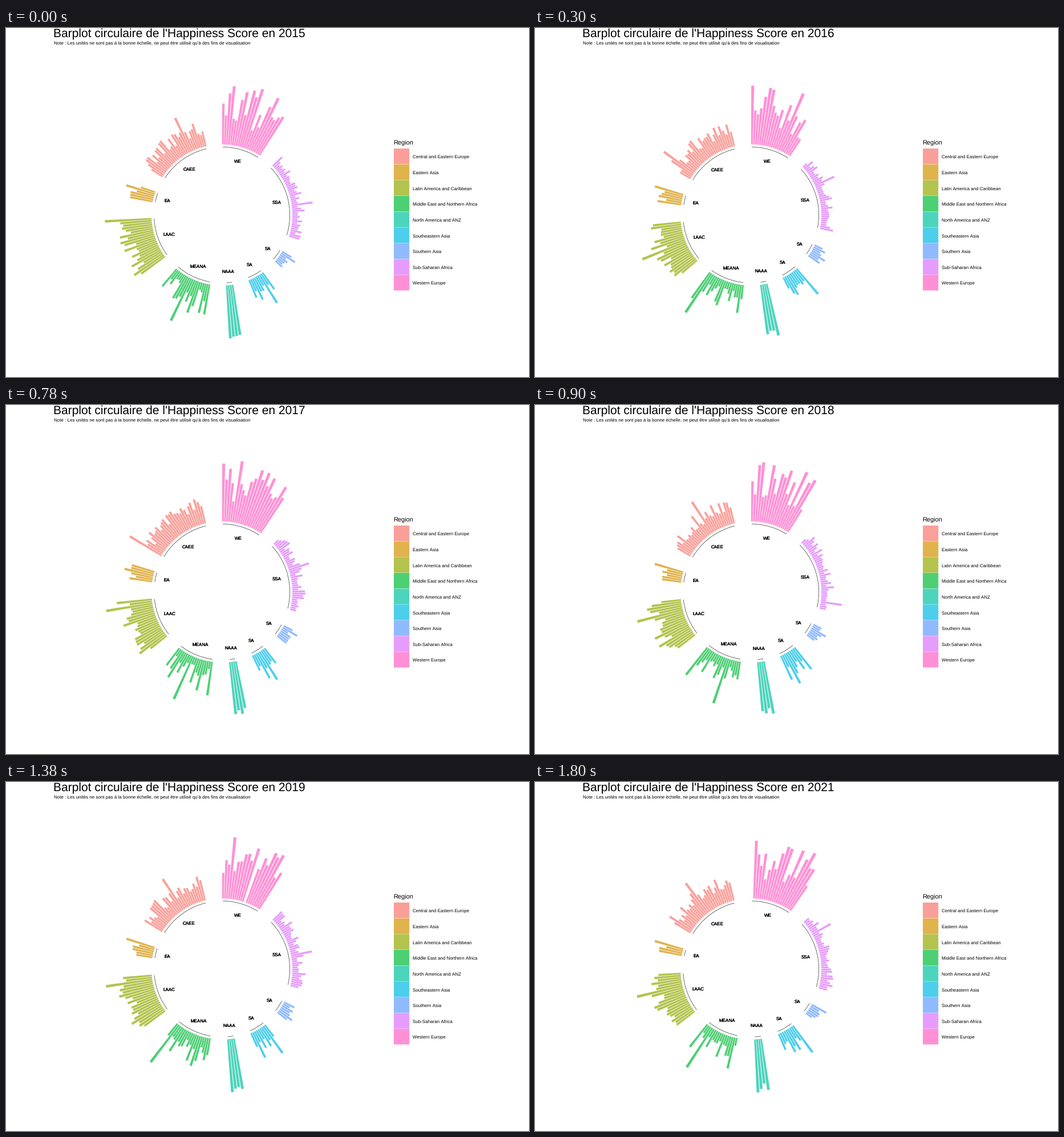
A matplotlib script for the animation above (2.1 s loop, 917 by 611 pixels).

```python
from collections import namedtuple

import numpy as np
import matplotlib.pyplot as plt
from matplotlib.animation import FuncAnimation
from matplotlib.collections import LineCollection, PolyCollection
from matplotlib.patches import Rectangle

plt.rcParams["font.family"] = "Liberation Sans"
plt.rcParams["text.hinting"] = "none"
plt.rcParams["text.hinting_factor"] = 1

W, H, DPI = 917, 611, 100
CX, CY = 378.6, 327.3
R_BAR, R_LINE, R_LABEL = 123.5, 119, 99
GAP = 8  # empty slots after each region
MARGIN = 0.1  # part of a slot left free on each side of a bar

# low, high and skew shape the bar lengths; the tallest bar reaches top
# and stands at a given place each year
Region = namedtuple("Region", "label name color size low high skew top peaks")
REGIONS = [
    Region("WE", "Western Europe", "#FF61C3", 21, 32, 105, 0.9, 108, (11, 14, 5, 15, 3, 3, 17)),
    Region("SSA", "Sub-Saharan Africa", "#DB72FB", 36, 9, 24, 2, 37, (23, 11, 15, 32, 20, 10, 7)),
    Region("SA", "Southern Asia", "#619CFF", 7, 12, 24, 1, 29, (1, 4, 1, 2, 5, 0, 0)),
    Region("SEA", "Southeastern Asia", "#00B9E3", 9, 18, 50, 1.4, 58, (2, 0, 3, 6, 1, 6, 0)),
    Region("NAAA", "North America and ANZ", "#00C19F", 4, 76, 92, 0.5, 93, (3, 0, 1, 0, 3, 0, 3)),
    Region("MEANA", "Middle East and Northern Africa", "#00BA38", 19, 13, 62, 1.7, 82,
           (10, 17, 10, 6, 17, 14, 13)),
    Region("LAAC", "Latin America and Caribbean", "#93AA00", 21, 34, 64, 1.3, 82,
           (21, 11, 18, 14, 17, 19, 14)),
    Region("EA", "Eastern Asia", "#D39200", 6, 25, 42, 0.9, 52, (4, 5, 3, 5, 5, 2, 3)),
    Region("CAEE", "Central and Eastern Europe", "#F8766D", 29, 20, 46, 1.1, 65,
           (20, 3, 0, 16, 15, 24, 13)),
]

# region sizes that depart from the usual, and western bars left blank
SIZES = {
    2015: dict(SSA=40, MEANA=20, LAAC=22),
    2016: dict(SSA=34, LAAC=22),
    2017: dict(SEA=8),
    2018: dict(WE=20, LAAC=20),
    2019: dict(WE=20, LAAC=20, CAEE=28),
    2020: dict(SA=6, MEANA=17, EA=4),
    2021: dict(SSA=35, SA=6, MEANA=17, EA=4, CAEE=28),
}
YEARS = list(SIZES)
BLANK = {2019: 11, 2020: 11, 2021: 0}


def tint(color, a=0.7):
    rgb = np.array([int(color[i:i + 2], 16) for i in (1, 3, 5)]) / 255
    return tuple(a * rgb + 1 - a)


def polar(r, turn):
    """Clockwise from twelve o'clock, in stage pixels."""
    return CX + r * np.sin(turn), CY - r * np.cos(turn)


def lengths(year, k):
    reg = REGIONS[k]
    rng = np.random.default_rng([year, k])
    n = SIZES[year].get(reg.label, reg.size)
    bars = reg.low + (reg.high - reg.low) * rng.random(n) ** reg.skew
    bars[reg.peaks[YEARS.index(year)]] = reg.top
    if k == 0 and year in BLANK:
        bars[BLANK[year]] = 0
    return bars


fig = plt.figure(figsize=(W / DPI, H / DPI), dpi=DPI, facecolor="white")
ax = fig.add_axes([0, 0, 1, 1])
ax.set(xlim=(0, W), ylim=(H, 0))
ax.axis("off")


def write(x, y, s, px, **kw):
    return ax.text(x, y, s, fontsize=px * 72 / DPI, color="black", va="baseline", **kw)


title = write(83, 15.3, "", 21.5)
write(83.5, 29.3, "Note : Les unités ne sont pas à la bonne échelle, "
      "ne peut être utilisé qu'à des fins de visualisation", 8.35)

write(679.5, 204.8, "Region", 10.8)
KEY = 27.65
for i, reg in enumerate(reversed(REGIONS)):
    top = 211 + i * KEY
    ax.add_patch(Rectangle((680, top), 27.2, KEY - 0.4, fc=tint(reg.color), lw=0, snap=False))
    write(713, top + KEY / 2 + 3.4, reg.name, 8.35)

bars = ax.add_collection(PolyCollection([], linewidths=0))
arcs = ax.add_collection(LineCollection([], colors="#333333", linewidths=0.5))
# stacked copies thicken the small labels
labels = [[write(0, 0, "SA" if reg.label == "SEA" else reg.label, 8.35, ha="center")
           for _ in range(3)] for reg in REGIONS]


def draw(frame):
    year = YEARS[frame]
    title.set_text(f"Barplot circulaire de l'Happiness Score en {year}")
    groups = [lengths(year, k) for k in range(len(REGIONS))]
    slot = 2 * np.pi / sum(len(g) + GAP for g in groups)
    quads, fills, lines, start = [], [], [], 0
    for reg, group, copies in zip(REGIONS, groups, labels):
        for i, length in enumerate(group):
            a, b = (start + i + MARGIN) * slot, (start + i + 1 - MARGIN) * slot
            tip = R_BAR + length
            quads.append([polar(R_BAR, a), polar(tip, a), polar(tip, b), polar(R_BAR, b)])
            fills.append(tint(reg.color))
        first, last = (start + 0.5) * slot, (start + len(group) - 0.5) * slot
        lines.append(np.column_stack(polar(R_LINE, np.linspace(first, last, 40))))
        x, y = polar(R_LABEL, (first + last) / 2)
        for t in copies:
            t.set_position((x, y + 3.3))
        start += len(group) + GAP
    bars.set_verts(quads)
    bars.set_facecolor(fills)
    arcs.set_segments(lines)
    return [title, bars, arcs]


anim = FuncAnimation(fig, draw, frames=len(YEARS), interval=300,
                     init_func=lambda: draw(0), repeat=True, repeat_delay=0)
plt.show()
```
